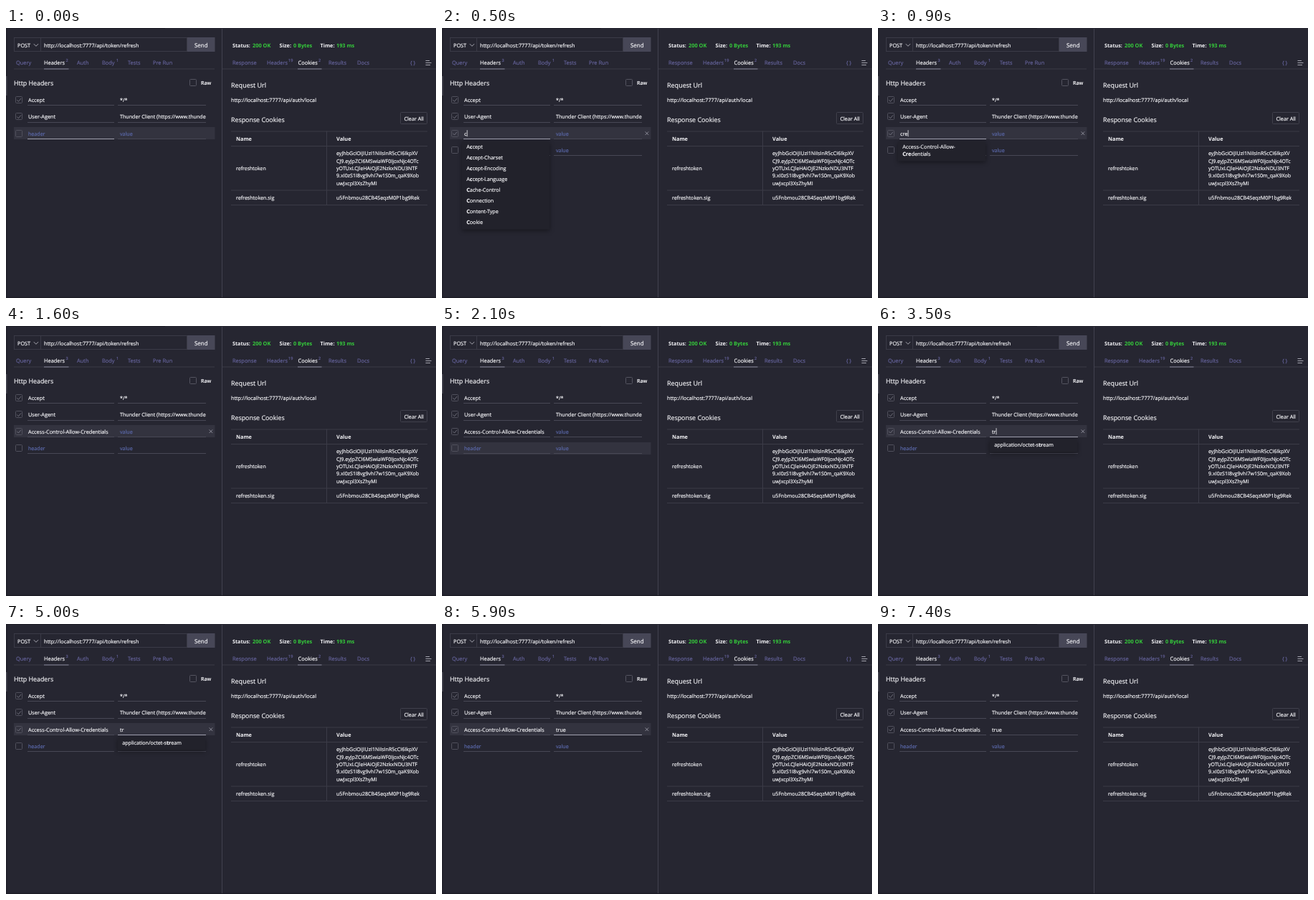
These frames come from a looping animation (600x376 px, 8000 ms). An HTML page:

```html
<!DOCTYPE html>
<html lang="en">
<head>
<meta charset="utf-8">
<title>Request headers</title>
<style>
  html, body { margin: 0; width: 100%; height: 100%; overflow: hidden; background: #262631; }
  svg { display: block; width: 600px; height: 376px; }
  text {
    font-family: "Open Sans", "Noto Sans", sans-serif;
    text-rendering: geometricPrecision; white-space: pre; stroke-width: .18px;
  }
</style>
</head>
<body>
<svg id="stage" viewBox="0 0 600 376" xmlns="http://www.w3.org/2000/svg">
  <defs>
    <clipPath id="cell"><rect x="156" y="90" width="123" height="90"/></clipPath>
    <filter id="shade" x="-20%" y="-40%" width="140%" height="200%" color-interpolation-filters="sRGB">
      <feDropShadow dx="0" dy="2" stdDeviation="3" flood-color="#000" flood-opacity=".4"/>
    </filter>
  </defs>
  <g id="fixed"></g>
  <g id="live"></g>
</svg>
<script>
const WHITE = '#f4f4f7', TAB = '#65639b', HINT = '#5b69ab', LINE = '#3b3b47', GREEN = '#35cc3b';
const LOOP = 8000, PITCH = 23.3, FIRST = 100;
const fixed = document.getElementById('fixed'), live = document.getElementById('live');

const text = (x, y, s, size = 7.2, fill = WHITE, extra = '') =>
  `<text x="${x}" y="${y}" font-size="${size}" fill="${fill}" stroke="${fill}" ${extra}>${s}</text>`;
const bold = (x, y, s, size = 7.3, fill = WHITE) =>
  text(x, y, s, size, fill, 'font-weight="700" style="stroke:none"');
const rect = (x, y, w, h, fill, extra = '') =>
  `<rect x="${x}" y="${y}" width="${w}" height="${h}" fill="${fill}" ${extra}/>`;
const box = (x, y, w, h, stroke, extra = '') => rect(x, y, w, h, 'none', `stroke="${stroke}" ${extra}`);
const path = (d, stroke, width = 1) =>
  `<path d="${d}" fill="none" stroke="${stroke}" stroke-width="${width}"/>`;
const rowY = i => FIRST + i * PITCH;

function drawFixed() {
  const tabs = [
    [14, 'Query'], [53, 'Headers', 1], [99, 'Auth'], [134, 'Body'], [170, 'Tests'], [205, 'Pre Run'],
    [316, 'Response'], [364, 'Headers'], [407.5, 'Cookies', 1], [450, 'Results'], [490, 'Docs']
  ];
  const token = [
    'eyJhbGciOiJIUzI1NiIsInR5cCI6IkpXV', 'CJ9.eyJpZCI6MSwiaWF0IjoxNjc4OTc',
    'yOTUxLCJleHAiOjE2NzkxNDU3NTF', '9.xI0zS1I8vg9vhI7w1S0m_qaK9Xob', 'uwJxcpl3XsZhyMI'
  ];
  fixed.innerHTML = [
    rect(0, 0, 600, 376, '#262631'),
    rect(0, 0, 222, 1, '#1e1e27'), rect(222, 0, 378, 1, '#292934'),
    rect(0, 0, 1.5, 376, '#1f1f28'), rect(0, 67, 1.5, 27, '#444450'),
    rect(0, 374.5, 600, 1.5, '#1d1d26'),
    rect(301, 1, 1, 374, '#42424f'),

    // request bar
    box(11.5, 13.5, 241, 19, LINE), rect(48, 14, 1, 19, LINE), rect(253, 13, 38.5, 20, '#474757'),
    text(16, 26.5, 'POST', 7.3), path('M38.8 22.2L41.9 25.3L45 22.2', '#b8b8c2', .9),
    text(53, 26.5, 'http://localhost:7777/api/token/refresh', 7.3),
    text(272.3, 26.5, 'Send', 8, WHITE, 'text-anchor="middle"'),

    // tabs
    rect(11, 56.5, 280, 1, LINE), rect(302, 56.5, 298, 1, LINE),
    rect(53, 56.5, 34.5, 1, '#85859a'), rect(407, 56.5, 33.5, 1, '#85859a'),
    ...tabs.map(([x, s, on]) => text(x, 50.7, s, 7.45, on ? WHITE : TAB)),
    text(154, 47.2, '1', 5.6, TAB), text(394, 47.2, '19', 5.6, TAB), text(436, 47.2, '2', 5.6, TAB),
    text(564, 50.7, '{ }', 7.2, TAB),
    path('M585.5 45.5H591M585.5 48.5H593.5M585.5 51.5H592', '#b4b4be', .9),

    // left heading
    text(11, 80.3, 'Http Headers', 8.85),
    box(256.5, 71.5, 9, 9, '#545460', 'rx="1"'),
    text(272, 79.4, 'Raw', 7, WHITE, 'font-weight="600"'),

    // response status
    bold(316, 26.8, 'Status:', 7.2), bold(344, 26.8, '200 OK', 7.4, GREEN),
    bold(381.6, 26.8, 'Size:', 7.4), bold(401, 26.8, '0 Bytes', 7.3, GREEN),
    bold(438.5, 26.8, 'Time:', 7.3), bold(461, 26.8, '193 ms', 7.3, GREEN),

    text(314, 83, 'Request Url', 9),
    text(314, 103, 'http://localhost:7777/api/auth/local', 7.22),
    text(314, 130.7, 'Response Cookies', 8.87),
    box(550.5, 117.5, 37, 16, '#40404c', 'rx="1"'),
    text(569.2, 128.8, 'Clear All', 7.2, WHITE, 'text-anchor="middle"'),

    // cookie table
    ...[143.5, 164, 225.5, 246].map(y => rect(314, y, 274, 1, LINE)),
    rect(447, 143.5, 1, 103, LINE),
    bold(321, 156.6, 'Name', 7.35), bold(461, 156.6, 'Value', 7.35),
    text(321, 197.8, 'refreshtoken', 7),
    ...token.map((s, i) => text(461, 177.3 + i * 10.35, s, 7.1)),
    text(321, 238.6, 'refreshtoken.sig', 7.1),
    text(461, 238.6, 'u5Fnbmou28CB4SeqzM0P1bg9Rek', 7.1)
  ].join('');
}

const mark = (s, key) => s.replace(new RegExp(key, 'i'), m => `<tspan font-weight="700">${m}</tspan>`);

const NAMES = ['Accept', 'Accept-Charset', 'Accept-Encoding', 'Accept-Language',
  'Cache-Control', 'Connection', 'Content-Type', 'Cookie'];
const TYPES = ['text/html', 'text/plain', 'text/css', 'text/xml',
  'application/octet-stream', 'multipart/form-data', 'text/csv', 'text/javascript'];
const CRED = ['Access-Control-Allow-', 'Credentials'];
const FULL = CRED.join('');

// Each step adds its changes to the state before it.
const STEPS = [
  [0, { name: '', value: '', used: 0, hover: 2, focus: 'name', caret: 0, list: null, key: '' }],
  [100, { caret: 1 }],
  [400, { name: 'c', used: 1, list: NAMES, key: 'c' }],
  [600, { name: 'cr', list: CRED, key: 'cr' }],
  [800, { name: 'cre', key: 'cre' }],
  [1400, { name: FULL, list: null, focus: '', caret: 0 }],
  [1900, { hover: 3 }],
  [2400, { hover: 2 }],
  [2700, { focus: 'value', caret: 1 }],
  [3200, { caret: 0 }],
  [3400, { value: 't', caret: 1, list: TYPES, key: 't' }],
  [3500, { value: 'tr', list: ['application/octet-stream'], key: 'tr' }],
  [3700, { caret: 0 }],
  [4200, { caret: 1 }],
  [4700, { caret: 0 }],
  [5200, { value: 'tru', caret: 1, list: null }],
  [5400, { value: 'true' }],
  [5900, { caret: 0 }],
  [6400, { hover: 3, focus: '' }],
  [6600, { hover: -1 }]
];
let sum = {};
const STATES = STEPS.map(([at, change]) => ({ at, ...(sum = { ...sum, ...change }) }));

function row(i, name, value, used, s) {
  const y = rowY(i), base = y + 2.9, line = Math.round(y + 7.2);
  const lit = col => i === 2 && s.focus === col ? '#a2a2b0' : '#484855';
  let out = '';
  if (s.hover === i) out += rect(11, Math.round(y - 8.3), 280.5, 17, '#33333f');
  out += box(13.5, Math.round(y - 5) + .5, 9, 9, '#50505c', 'rx="1"');
  if (used) out += path(`M15.3 ${y + .2}l2.1 2.2l3.5 -4.3`, '#747480', .9);
  out += rect(30, line, 121, 1, lit('name')) + rect(156, line, 123, 1, lit('value'));
  out += text(31, base, name || 'header', name ? 7.32 : 7.1, name ? WHITE : HINT, i === 2 ? 'id="name"' : '');
  out += text(159, base, value || 'value', 7.14, value ? WHITE : HINT,
    'clip-path="url(#cell)"' + (i === 2 ? ' id="value"' : ''));
  if (s.hover === i && used) out += path(`M283.6 ${y - 2.2}l4.6 4.6m0 -4.6l-4.6 4.6`, '#a0a0ac', .8);
  return out;
}

function dropdown(s) {
  if (!s.list) return '';
  const wrapped = s.list === CRED, x = s.focus === 'name' ? 28 : 156;
  const gap = wrapped ? 9.8 : 15;
  const h = 17.5 + (s.list.length - 1) * gap;
  return rect(x, 158, 122, h, '#22222b', 'filter="url(#shade)"') +
    s.list.map((item, i) => text(x + 6.2, 168.4 + i * gap,
      wrapped && !i ? item : mark(item, s.key), wrapped ? 7.35 : 7.15)).join('');
}

function drawState(s) {
  const rows = [['Accept', '*/*', 1], ['User-Agent', 'Thunder Client (https://www.thunde', 1], [s.name, s.value, s.used]];
  if (s.used) rows.push(['', '', 0]);
  live.innerHTML = text(83.4, 47.2, s.used ? '3' : '2', 5.6, TAB) +
    rows.map((r, i) => row(i, ...r, s)).join('') + dropdown(s);
  if (s.caret) {
    const field = document.getElementById(s.focus);
    const end = s[s.focus] ? field.getComputedTextLength() : 0;
    live.insertAdjacentHTML('beforeend',
      rect(+field.getAttribute('x') + end + .2, rowY(2) - 4.4, .8, 9, WHITE));
  }
}

drawFixed();
let shown = null;
const start = performance.now();
function frame() {
  const t = (performance.now() - start) % LOOP;
  const s = STATES.findLast(v => v.at <= t);
  if (s !== shown) drawState(shown = s);
  requestAnimationFrame(frame);
}
frame();
</script>
</body>
</html>
```
